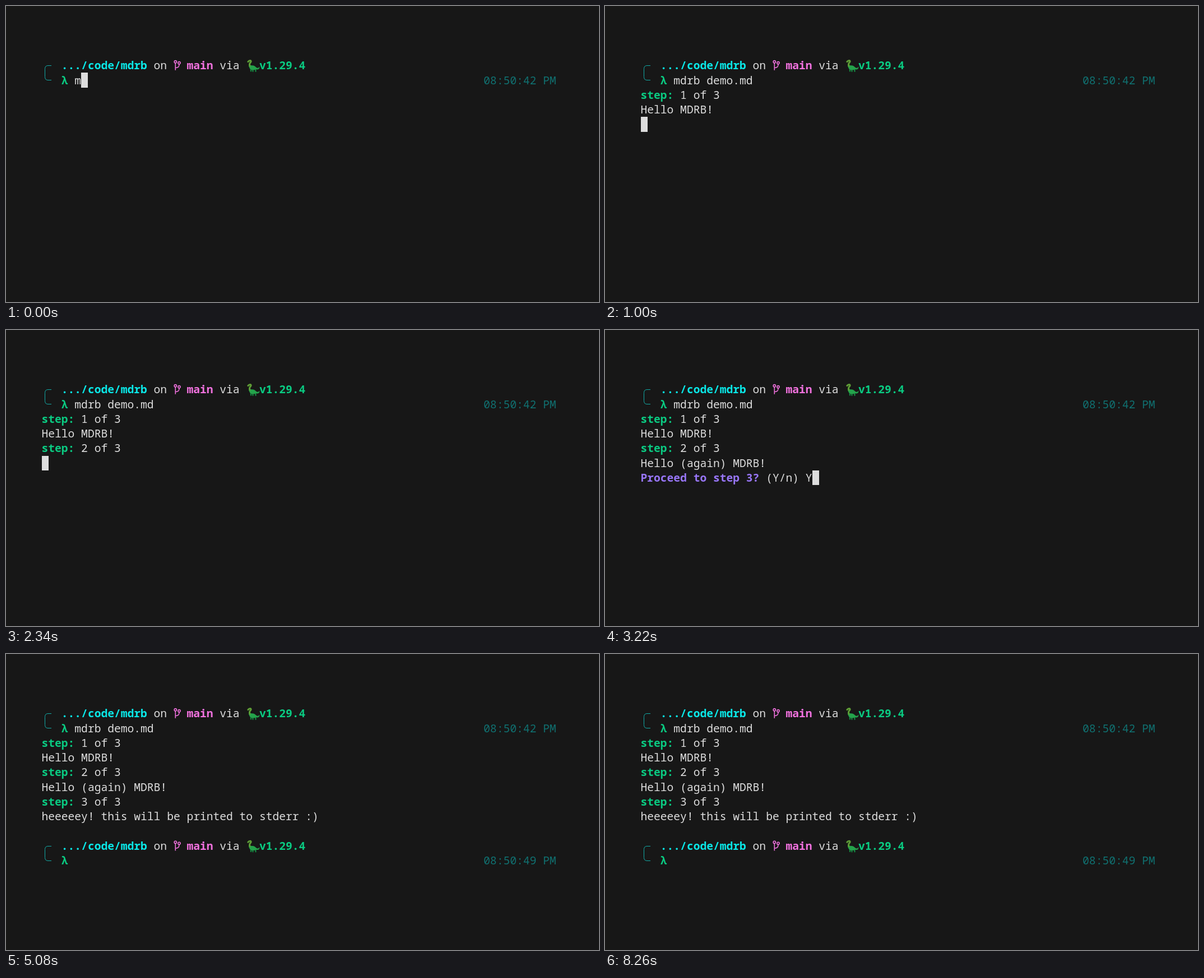
These frames come from a looping animation (1058 by 529 pixels, 8520 ms). An HTML page with a canvas:

```html
<!DOCTYPE html>
<html lang="en">
<head>
<meta charset="utf-8">
<title>Terminal session</title>
<style>
  html, body { margin: 0; width: 100%; height: 100%; overflow: hidden; background: #171717; }
  canvas { display: block; }
</style>
</head>
<body>
<canvas id="stage" width="1058" height="529"></canvas>
<script>
const ctx = document.getElementById('stage').getContext('2d');
const LOOP = 8520;
const LEFT = 63.5, TOP = 93.1, CELL = 11.77, ROW = 26.3, BASE = 20.1;
const FACE = (CELL / 0.6) + 'px "Noto Sans Mono", "DejaVu Sans Mono", monospace';
const BG = '#171717', FG = '#dddddd', GREEN = '#0acb82', CYAN = '#0ae8e8',
      PINK = '#f272df', VIOLET = '#9876f8', DIM = '#107070', LINE = '#12aaa6';
const COMMAND = 'mdrb demo.md';

const colX = col => LEFT + col * CELL;
const rowY = row => TOP + row * ROW;

// One glyph per terminal cell
function put(text, col, row, color = FG, bold = false) {
  ctx.font = (bold ? '700 ' : '400 ') + FACE;
  ctx.fillStyle = color;
  [...text].forEach((ch, i) => {
    if (ch !== ' ') ctx.fillText(ch, colX(col + i), rowY(row) + BASE);
  });
}

function cursor(col, row) {
  ctx.fillStyle = FG;
  const x = Math.round(colX(col)), y = Math.round(rowY(row));
  ctx.fillRect(x, y, 12, Math.round(rowY(row + 1)) - y);
}

function bracket(row) {
  const x = 69.5, top = Math.round(rowY(row) + 13) + 0.5, bottom = top + 26;
  ctx.strokeStyle = LINE;
  ctx.lineWidth = 1;
  ctx.beginPath();
  ctx.moveTo(81, top);
  ctx.lineTo(75, top);
  ctx.quadraticCurveTo(x, top, x, top + 6);
  ctx.lineTo(x, bottom - 6);
  ctx.quadraticCurveTo(x, bottom, 75, bottom);
  ctx.lineTo(81, bottom);
  ctx.stroke();
}

function branch(row) {
  ctx.save();
  ctx.translate(colX(20), rowY(row));
  ctx.strokeStyle = PINK;
  ctx.lineWidth = 1.6;
  ctx.beginPath();
  ctx.arc(3.4, 6.6, 2.1, 0, 7);
  ctx.moveTo(12.2, 8.6);
  ctx.arc(10.1, 8.6, 2.1, 0, 7);
  ctx.moveTo(3.4, 8.8);
  ctx.lineTo(3.4, 21.6);
  ctx.moveTo(10.1, 10.8);
  ctx.bezierCurveTo(10.1, 16.5, 8, 16.6, 3.4, 17.6);
  ctx.stroke();
  ctx.restore();
}

function dinosaur(row) {
  ctx.save();
  ctx.translate(429, rowY(row) + 1.6);
  ctx.lineCap = ctx.lineJoin = 'round';
  const legs = [[8, 17, 8, 21.5], [11, 17, 11.5, 22], [16, 17, 16.5, 22]];
  ctx.strokeStyle = '#16813f';
  ctx.lineWidth = 2.4;
  ctx.beginPath();
  for (const [x1, y1, x2, y2] of legs) {
    ctx.moveTo(x1, y1);
    ctx.lineTo(x2, y2);
  }
  ctx.stroke();

  ctx.fillStyle = '#24a34b';
  ctx.beginPath();
  ctx.moveTo(4, 9);
  ctx.quadraticCurveTo(6.5, 12, 11, 11.5);
  ctx.bezierCurveTo(16, 11.5, 16.5, 16, 20, 16);
  ctx.quadraticCurveTo(22, 16, 23.2, 13.5);
  ctx.bezierCurveTo(24, 18.5, 20, 19, 17.5, 18.6);
  ctx.bezierCurveTo(13, 20.5, 8, 20, 6, 17);
  ctx.quadraticCurveTo(3.4, 13.5, 4, 9);
  ctx.fill();

  ctx.strokeStyle = '#5f9e36';
  ctx.lineWidth = 2.9;
  ctx.beginPath();
  ctx.moveTo(2.8, 5);
  ctx.bezierCurveTo(5, 2, 9, 2, 8, 5.2);
  ctx.quadraticCurveTo(4.6, 8, 6, 12.5);
  ctx.stroke();
  ctx.restore();
}

function prompt(row, time) {
  bracket(row);
  put('.../code/mdrb', 3, row, CYAN, true);
  put('on', 17, row);
  branch(row);
  put('main', 22, row, PINK, true);
  put('via', 27, row);
  dinosaur(row);
  put('v1.29.4', 33, row, GREEN, true);
  put('λ', 3, row + 1, GREEN, true);
  put(time, 67, row + 1, DIM);
}

function step(n, row) {
  put('step:', 0, row, GREEN, true);
  put(n + ' of 3', 6, row);
}

function question(n, row, answered) {
  put(`Proceed to step ${n}?`, 0, row, VIOLET, true);
  put('(Y/n)' + (answered ? ' Y' : ''), 19, row);
}

// Typing runs at 50 ms per key on a 20 ms clock
function typedCount(t) {
  let n = 1;
  while (n < COMMAND.length && t >= 20 * Math.floor((20 + 50 * (n - 1)) / 20)) n++;
  return n;
}

// Asks for the next step, then gives way to that step's heading
function ask(t, n, row, shown, ready, answer, done) {
  if (t >= done) {
    step(n, row);
  } else if (t >= shown) {
    question(n, row, t >= answer);
    if (t >= ready) cursor(t >= answer ? 26 : 25, row);
  }
}

function draw(t) {
  ctx.fillStyle = BG;
  ctx.fillRect(0, 0, 1058, 529);
  prompt(0, '08:50:42 PM');

  const n = typedCount(t);
  put(COMMAND.slice(0, n), 5, 1);
  if (t < 560) cursor(5 + n, 1);
  else if (t < 720) cursor(0, 2);

  if (t >= 720) step(1, 2);
  if (t >= 740 && t < 1000) cursor(0, 3);
  if (t >= 1000) put('Hello MDRB!', 0, 3);
  if (t >= 1000 && t < 1020) cursor(0, 4);
  ask(t, 2, 4, 1020, 1040, 1400, 2340);

  if (t >= 2340 && t < 2620) cursor(0, 5);
  if (t >= 2620) put('Hello (again) MDRB!', 0, 5);
  if (t >= 2620 && t < 2640) cursor(0, 6);
  ask(t, 3, 6, 2660, 2680, 3220, 4160);

  if (t >= 4160 && t < 4460) cursor(0, 7);
  if (t >= 4460) put('heeeeey! this will be printed to stderr :)', 0, 7);
  if (t >= 4460 && t < 4520) cursor(0, 8);

  if (t >= 4520) {
    prompt(9, '08:50:49 PM');
    const blinks = [5080, 5600, 6140, 6660, 7200, 7720, 8260];
    if (blinks.filter(b => t >= b).length % 2 === 0) cursor(5, 10);
  }
}

const start = performance.now();
function tick() {
  draw((performance.now() - start) % LOOP);
  requestAnimationFrame(tick);
}
tick();
</script>
</body>
</html>
```
